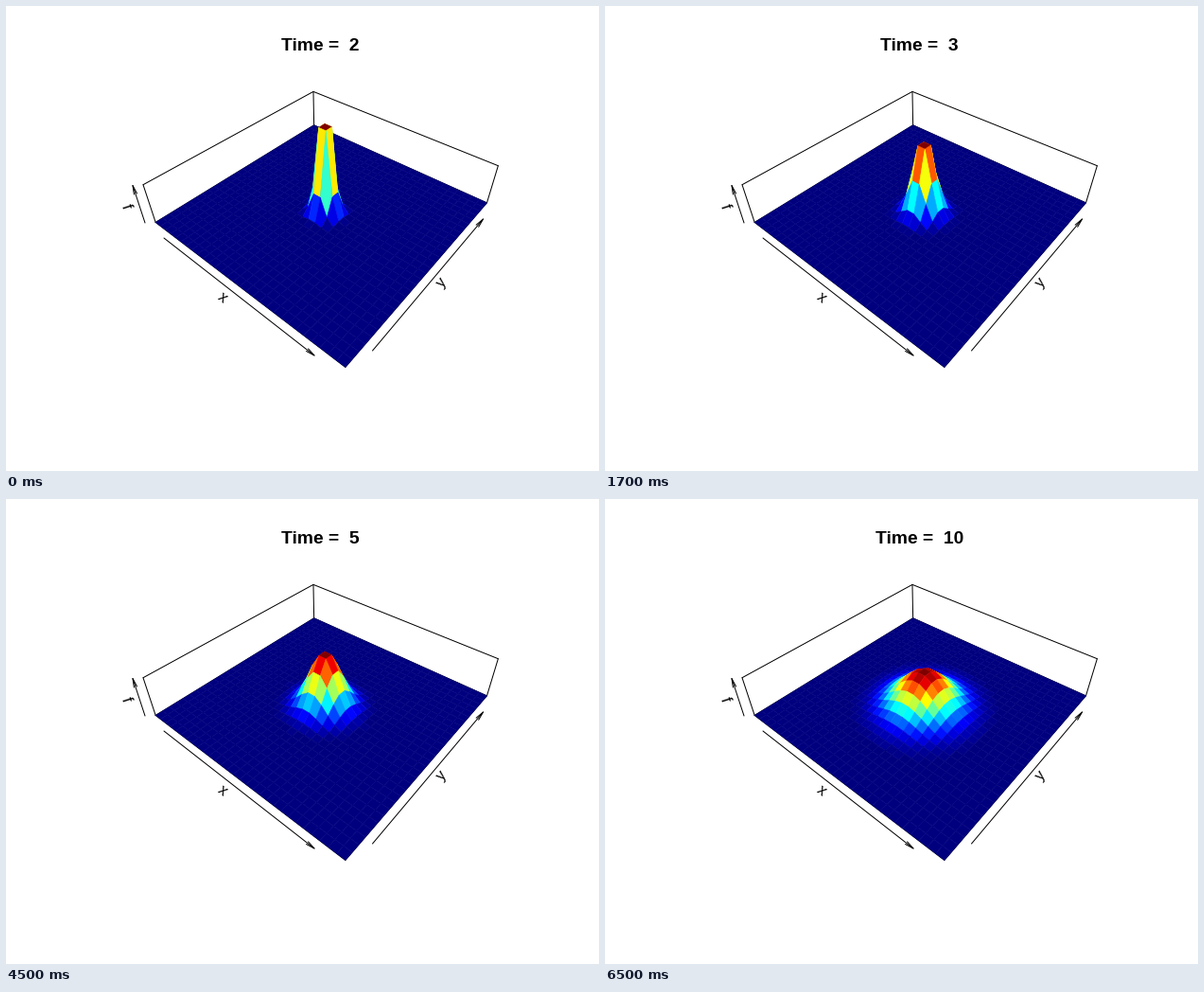
Recreate the animation shown at these times as a matplotlib script. Size 627 by 491 pixels, loop 8 s.

```python
import numpy as np
import matplotlib.pyplot as plt
from matplotlib.animation import FuncAnimation
from matplotlib.collections import PolyCollection
from matplotlib.colors import LinearSegmentedColormap

WIDTH, HEIGHT, DPI = 627, 491, 64
PX = 72 / DPI  # points per pixel

# Perspective view: the box is [-1, 1] x [-1, 1] x [-EXPAND, EXPAND]
THETA, PHI = np.radians(40), np.radians(40)
EYE = np.sqrt(3) + 2
EXPAND = 0.2
ZOOM, CENTER_X, CENTER_Y = 479.7, 337.6, 198.83

GRID = 30
# time, peak height in box heights, variance in grid cells
STATES = [(2, 2.10, 0.83), (3, 1.70, 1.75), (4, 1.475, 2.8),
          (5, 1.31, 3.75), (10, 0.89, 8.4)]

JET = LinearSegmentedColormap.from_list(
    "jet100", ["#00007F", "blue", "#007FFF", "cyan", "#7FFF7F",
               "yellow", "#FF7F00", "red", "#7F0000"], N=100)


def project(x, y, z):
    """Map box coordinates to stage pixels."""
    across = x * np.cos(THETA) + y * np.sin(THETA)
    away = y * np.cos(THETA) - x * np.sin(THETA)
    up = z * np.cos(PHI) + away * np.sin(PHI)
    depth = EYE - z * np.sin(PHI) + away * np.cos(PHI)
    return np.stack([CENTER_X + ZOOM * across / depth,
                     CENTER_Y - ZOOM * up / depth], axis=-1)


def corners(a):
    """The four corner values of every grid cell, in drawing order."""
    quads = np.stack([a[:-1, :-1], a[1:, :-1], a[1:, 1:], a[:-1, 1:]], axis=2)
    return quads.reshape((-1, 4) + a.shape[2:])


axis = np.linspace(-1, 1, GRID)
X, Y = np.meshgrid(axis, axis, indexing="ij")
cell_away = corners(Y * np.cos(THETA) - X * np.sin(THETA)).mean(axis=1)
BACK_TO_FRONT = np.argsort(-cell_away, kind="stable")


def surface(peak, variance):
    """Facet polygons and colours of the spreading hump."""
    steps = np.arange(GRID) - (GRID - 1) / 2
    profile = np.exp(-(steps ** 2 - 0.25) / (2 * variance))
    f = np.outer(profile, profile)
    points = project(X, Y, EXPAND * (2 * peak * f - 1))
    level = corners(f).mean(axis=1)
    return corners(points)[BACK_TO_FRONT], JET(level / level.max())[BACK_TO_FRONT]


fig = plt.figure(figsize=(WIDTH / DPI, HEIGHT / DPI), dpi=DPI, facecolor="white")
ax = fig.add_axes([0, 0, 1, 1])
ax.set_xlim(0, WIDTH)
ax.set_ylim(HEIGHT, 0)
ax.axis("off")


def line(points, zorder=1):
    points = np.asarray(points)
    ax.plot(points[:, 0], points[:, 1], color="black", lw=PX, zorder=zorder,
            solid_capstyle="round", solid_joinstyle="round")


def arrow(start, end):
    start, end = np.array(start), np.array(end)
    line([start, end], 3)
    back = np.arctan2(*(start - end)[::-1])
    barbs = [end + 9.6 * np.array([np.cos(back + d), np.sin(back + d)])
             for d in np.radians([-10, 10])]
    line([barbs[0], end, barbs[1]], 3)


def label(text, x, y, size, angle=0, weight="normal"):
    return ax.text(x, y, text, fontsize=size * PX, fontfamily="Liberation Sans",
                   fontweight=weight, rotation=angle, rotation_mode="anchor",
                   ha="center", va="baseline", color="black", zorder=4)


# Box: floor outline and the two back walls
left, back, right, front = (-1, -1), (-1, 1), (1, 1), (1, -1)
line([project(*c, -EXPAND) for c in (left, back, right, front, left)])
line([project(*c, EXPAND) for c in (left, back, right)])
for c in (left, back, right):
    line([project(*c, -EXPAND), project(*c, EXPAND)])

arrow((167, 245), (326, 369))
arrow((387.5, 364), (504.5, 225))
arrow((147, 229), (134, 189.5))
label("x", 226.4, 311.3, 16, -38)
label("y", 463.9, 294.6, 16, 49.7)
label("f", 122.9, 212.8, 16, -72)
title = label("", 332.7, 47, 19.2, weight="bold")

facets = PolyCollection([], edgecolors="face", linewidths=0.5 * PX, zorder=2)
ax.add_collection(facets, autolim=False)


def draw(i):
    time, peak, variance = STATES[(i + 3) // 4]
    polygons, colors = surface(peak, variance)
    facets.set_verts(polygons)
    facets.set_facecolor(colors)
    title.set_text(f"Time =  {time}")
    return facets, title


anim = FuncAnimation(fig, draw, frames=16, interval=500, repeat=True)
plt.show()
```
